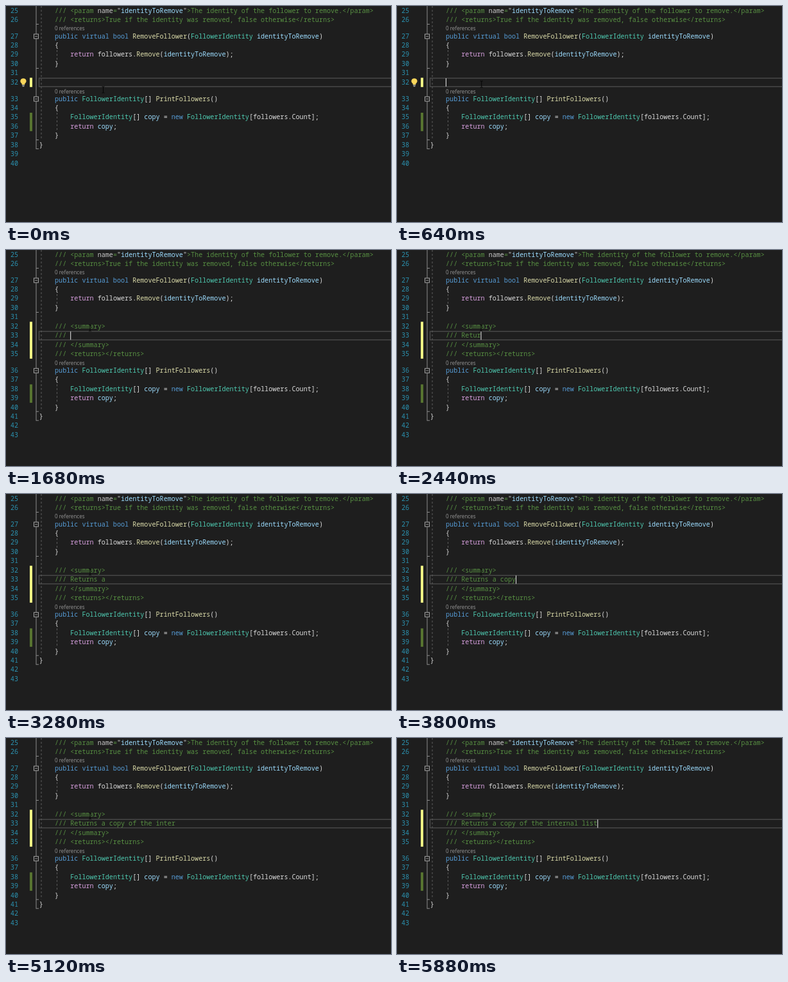
Animation, 600 px wide and 338 px high, one loop 5.92 s. Source, as an HTML page:

```html
<!DOCTYPE html>
<html lang="en">
<head>
<meta charset="utf-8">
<title>Documentation comment</title>
<style>
  html, body { margin: 0; width: 100%; height: 100%; overflow: hidden; background: #1e1e1e; }
  svg { display: block; width: 600px; height: 338px; }
  text { white-space: pre; font: 10.1px "Noto Sans Mono", "DejaVu Sans Mono", monospace; fill: #dcdcdc; }
  .num { fill: #2b91af; text-anchor: end; }
  .lens { font: 8.1px "Open Sans", "Noto Sans", sans-serif; fill: #999; }
  .k { fill: #569cd6; }
  .r { fill: #d8a0df; }
  .t { fill: #4ec9b0; }
  .m { fill: #dcdcaa; }
  .v { fill: #9cdcfe; }
  .a { fill: #c8c8c8; }
  .d { fill: #578f42; }
  .c { fill: #57a64a; }
  .outline { stroke: #8c8c8c; fill: none; }
  .fold { stroke: #a5a5a5; fill: #1e1e1e; }
  .guide { stroke: #5c5c5c; stroke-dasharray: 3 3; }
  .current { stroke: #4b4b4b; stroke-width: 1.4; fill: none; }
  .mouse { stroke: #050505; fill: none; }
  .caret { stroke: #dcdcdc; stroke-width: 1.1; }
</style>
</head>
<body>
<svg viewBox="0 0 600 338">
  <rect id="current" class="current" x="51.5" y="113" width="560" height="13.2"/>
  <rect id="unsaved" x="37" y="112.3" width="4" fill="#eff284"/>
  <line id="spine" class="outline" x1="47" x2="47" y1="0"/>
  <line id="classGuide" class="guide" x1="55" x2="55" y1="0"/>
  <path class="outline" d="M47 28.5h4M47 97.5h4"/>
  <line class="guide" x1="79.5" x2="79.5" y1="69" y2="84"/>
  <g id="top"></g>
  <g id="docs"></g>
  <g id="method">
    <rect x="37" y="167" width="4" height="28.8" fill="#577430"/>
    <path class="outline" d="M47 209.5h4M47 223.5h4"/>
    <line class="guide" x1="79.5" x2="79.5" y1="167" y2="196"/>
  </g>
  <g id="bulb">
    <path d="M24.7 121.5C20.500 118.500 22.500 113.300 27 113.300S33.500 118.500 29.300 121.500V123H24.700Z" fill="#fbd65b"/>
    <path d="M25 124h4M25.600 125.700h2.800" stroke="#c9c9c9"/>
  </g>
  <path id="mouse" class="mouse" d="M-2 -5h1.500l.5 .5l.5 -.5h1.500M0 -4.500V4.500M-2 5h1.500l.5 -.5l.5 .5h1.500"/>
  <line id="caret" class="caret"/>
</svg>
<script>
const LOOP = 5920, PITCH = 14.43, CHAR = 6.06, LEFT = 51.8;
const GROWTH = 3 * PITCH;
const EXPAND = 1440;
const SENTENCE = "Returns a copy of the internal list";
// [time, characters typed]
const TYPING = [[1900, 0], [2440, 5.2], [3100, 9], [3280, 9.4], [4440, 20.3], [5820, 35]];

const $ = id => document.getElementById(id);
const colX = col => LEFT + col * CHAR;

function add(parent, tag, attrs, content = "") {
  const el = document.createElementNS("http://www.w3.org/2000/svg", tag);
  for (const name in attrs) el.setAttribute(name, attrs[name]);
  el.textContent = content;
  parent.append(el);
  return el;
}

// Source markup: {class|text} colours a run.
function code(parent, y, col, source) {
  const line = add(parent, "text", { x: colX(col), y: y + 3.5 });
  for (const [, cls, run, plain] of source.matchAll(/\{(\w)\|([^}]*)\}|([^{]+|\{)/g))
    add(line, "tspan", { class: cls || "" }, run ?? plain);
  return line;
}

const number = (parent, y, n) =>
  add(parent, "text", { class: "num", x: 19.2, y: y + 3.5 }, n);

const lens = (parent, y) =>
  add(parent, "text", { class: "lens", x: 76, y: y - 8.6 }, "0 references");

function fold(parent, y) {
  add(parent, "rect", { class: "fold", x: 43.5, y: y - 3.5, width: 7, height: 7 });
  add(parent, "path", { class: "outline", d: `M45 ${y}h4` });
}

function block(parent, y0, first, lines) {
  return lines.map(([col, source], i) => {
    const y = y0 + i * PITCH;
    if (source) code(parent, y, col, source);
    return number(parent, y, first + i);
  });
}

const top_ = $("top"), docs = $("docs"), method = $("method");

block(top_, 7.1, 25, [
  [4, '{d|/// <param }{a|name}{d|=}{a|"}{v|identityToRemove}{a|"}{d|>The identity of the follower to remove.</param>}'],
  [4, "{d|/// <returns>True if the identity was removed, false otherwise</returns>}"]
]);
block(top_, 47, 27, [
  [4, "{k|public virtual bool} {m|RemoveFollower}({t|FollowerIdentity} {v|identityToRemove})"],
  [4, "{"],
  [8, "{r|return} followers.{m|Remove}({v|identityToRemove});"],
  [4, "}"],
  [0, ""],
  [0, ""]
]);
lens(top_, 47);
fold(top_, 47.5);

const docY = 119.3;
block(docs, docY + PITCH, 33, [
  [4, "{d|/// }"],
  [4, "{d|/// </summary>}"],
  [4, "{d|/// <returns></returns>}"]
]);
code(docs, docY, 4, "{d|/// <summary>}");
const typed = add(docs, "text", { class: "d", x: colX(8), y: docY + PITCH + 3.5 });
const slashes = add($("top"), "text", { class: "c", x: colX(4), y: docY + 3.5 });

const methodNumbers = block(method, 145.1, 33, [
  [4, "{k|public} {t|FollowerIdentity}[] {m|PrintFollowers}()"],
  [4, "{"],
  [8, "{t|FollowerIdentity}[] {v|copy} = {k|new} {t|FollowerIdentity}[followers.Count];"],
  [8, "{r|return} {v|copy};"],
  [4, "}"],
  [0, "}"],
  [0, ""],
  [0, ""]
]);
lens(method, 145.1);
fold(method, 145.5);

function lengthAt(t) {
  const i = TYPING.findIndex(([time]) => time > t);
  if (i === 0) return 0;
  if (i < 0) return SENTENCE.length;
  const [t0, n0] = TYPING[i - 1], [t1, n1] = TYPING[i];
  return Math.floor(n0 + (n1 - n0) * (t - t0) / (t1 - t0));
}

const show = (el, on) => el.setAttribute("visibility", on ? "visible" : "hidden");

function setLayout(open) {
  const shift = open ? GROWTH : 0;
  show(docs, open);
  method.setAttribute("transform", `translate(0 ${shift})`);
  methodNumbers.forEach((el, i) => { el.textContent = 33 + i + (open ? 3 : 0); });
  $("current").setAttribute("y", open ? 127.4 : 113);
  $("unsaved").setAttribute("height", 14.5 + shift);
  $("spine").setAttribute("y2", 224 + shift);
  $("classGuide").setAttribute("y2", 209 + shift);
}

function draw(t) {
  const open = t >= EXPAND;
  setLayout(open);

  const count = lengthAt(t);
  typed.textContent = SENTENCE.slice(0, count);
  const slashCount = open ? 0 : (t >= 1000) + (t >= 1180);
  slashes.textContent = "/".repeat(slashCount);
  show($("bulb"), t < 1000);

  const p = Math.min(1, Math.max(0, (t - 200) / 500));
  const ease = p * p * (3 - 2 * p);
  $("mouse").setAttribute("transform", `translate(${151.5 - 20.5 * ease} ${131 - 9 * ease})`);

  const x = colX(open ? 8 + count : 4 + slashCount) + 0.4;
  const y = docY + (open ? PITCH : 0);
  const caret = $("caret");
  Object.entries({ x1: x, x2: x, y1: y - 6.2, y2: y + 6.8 })
    .forEach(([name, value]) => caret.setAttribute(name, value));
  const blink = t % 1060;
  show(caret, blink >= 270 && blink < 800);
}

function tick() {
  draw(performance.now() % LOOP);
  requestAnimationFrame(tick);
}
tick();
</script>
</body>
</html>
```
